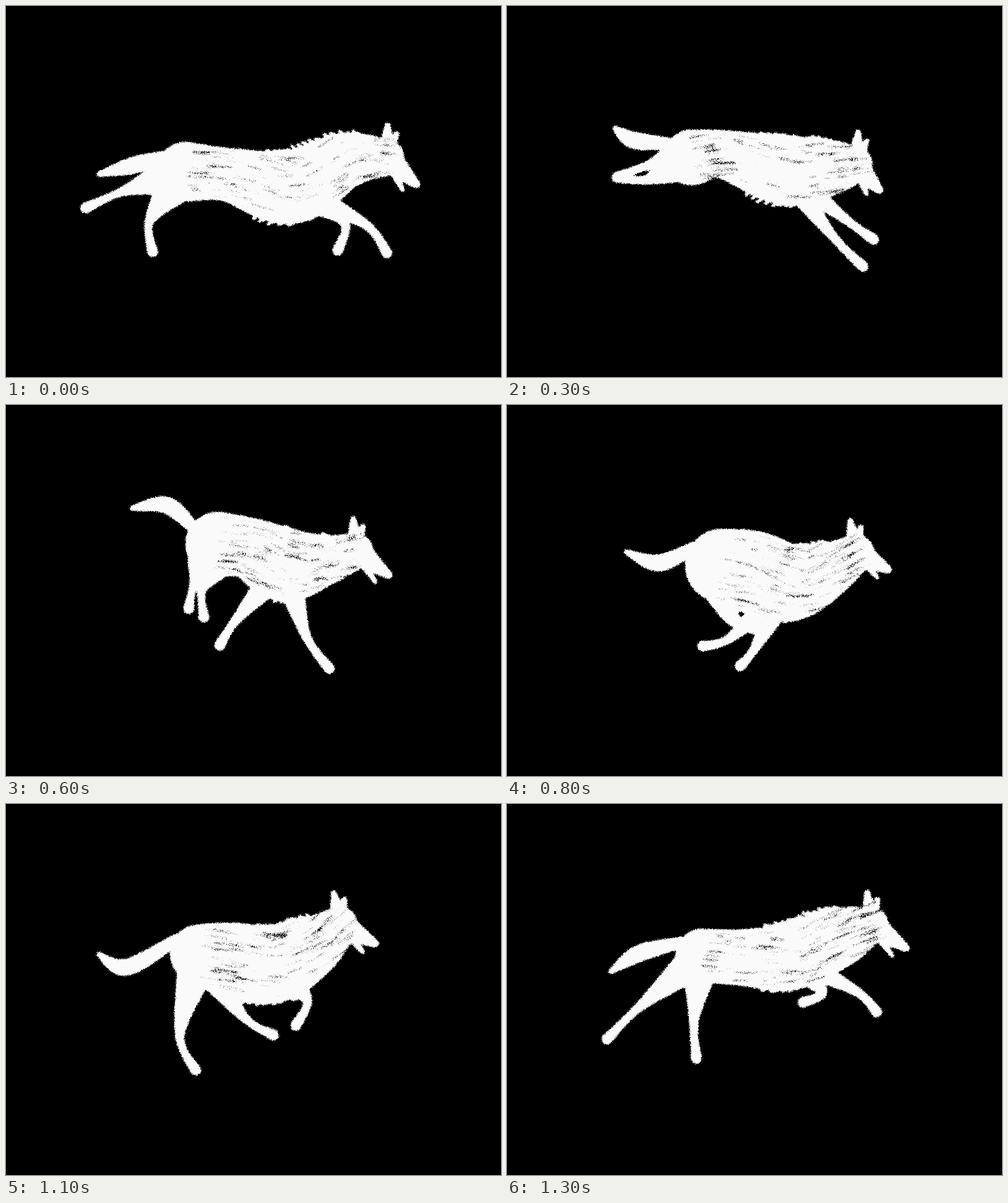
Animation of 800 by 600 pixels, one loop 1.4 s. Source, as an HTML page with a canvas:

```html
<!DOCTYPE html>
<html lang="en">
<head>
<meta charset="utf-8">
<title>Running wolf</title>
<style>
  html, body { margin: 0; width: 100%; height: 100%; overflow: hidden; background: #000; }
  canvas { display: block; }
</style>
</head>
<body>
<canvas id="stage" width="800" height="600"></canvas>
<script>
const W = 800, H = 600, STEP = 100, COUNT = 14, SKULL = 29;

// A few joints pose the wolf; every outline grows from them by rule.
// spine: rump, loin, chest, neck (x, y, radius); head: skull, nose; tail: middle, tip;
// legs: joint and foot of two hind legs, then of two forelegs.
const poses = [];
const pose = (time, spine, head, tail, legs) => poses.push({ time, spine, head, tail, legs });

pose(0, [290, 268, 48, 360, 273, 43, 460, 293, 59, 548, 250, 44],
  [615, 245, 664, 289], [205, 258, 150, 272],
  [188, 300, 128, 327, 232, 348, 237, 398, 547, 350, 536, 396, 582, 354, 616, 400]);
pose(300, [298, 245, 45, 350, 240, 39, 445, 265, 55, 515, 262, 46],
  [562, 256, 602, 298], [205, 217, 175, 198],
  [228, 258, 177, 277, 225, 281, 178, 277, 528, 374, 576, 422, 550, 347, 593, 378]);
pose(500, [332, 237, 48, 375, 242, 42, 445, 272, 58, 510, 270, 41],
  [555, 258, 594, 295], [243, 178, 206, 181],
  [276, 285, 242, 321, 280, 285, 260, 332, 412, 378, 428, 412, 522, 382, 579, 425]);
pose(600, [342, 225, 52, 395, 232, 49, 450, 258, 59, 510, 252, 41],
  [565, 236, 619, 275], [260, 162, 204, 167],
  [304, 290, 295, 330, 316, 300, 320, 344, 370, 350, 345, 389, 486, 375, 523, 427]);
pose(900, [350, 277, 63, 400, 290, 75, 460, 302, 63, 520, 275, 46],
  [565, 240, 615, 262], [238, 302, 187, 273],
  [395, 395, 469, 412, 390, 370, 441, 383, 355, 387, 301, 383, 357, 385, 303, 383]);
pose(1100, [312, 242, 47, 365, 250, 58, 430, 260, 62, 495, 230, 48],
  [540, 195, 597, 226], [195, 264, 150, 243],
  [281, 374, 307, 431, 385, 345, 433, 374, 470, 300, 465, 310, 487, 318, 468, 359]);
pose(1300, [315, 245, 43, 375, 248, 45, 455, 247, 53, 530, 218, 49],
  [588, 195, 645, 233], [213, 242, 168, 271],
  [212, 330, 161, 381, 302, 352, 306, 412, 510, 305, 478, 321, 566, 304, 598, 337]);
poses.push({ ...poses[0], time: COUNT * STEP });

const mix = (a, b, k) => a + (b - a) * k;
const polar = ([x, y], angle, len) => [x + len * Math.cos(angle), y + len * Math.sin(angle)];

function seeded(s) {
  return () => {
    s = s + 0x6D2B79F5 | 0;
    let t = Math.imul(s ^ s >>> 15, 1 | s);
    t = t + Math.imul(t ^ t >>> 7, 61 | t) ^ t;
    return ((t ^ t >>> 14) >>> 0) / 4294967296;
  };
}

function group(list, size) {
  const out = [];
  for (let i = 0; i < list.length; i += size) out.push(list.slice(i, i + size));
  return out;
}

function poseAt(time) {
  const i = poses.findIndex(p => p.time > time);
  const a = poses[i - 1], b = poses[i];
  const k = (time - a.time) / (b.time - a.time);
  const between = part => a[part].map((n, j) => mix(n, b[part][j], k));
  const legs = group(group(between('legs'), 2), 2);
  // Feet travel in arcs: low when pushing back, lifted when reaching forward.
  legs.forEach(([joint, foot], l) => {
    const lift = (b.legs[l * 4 + 2] - a.legs[l * 4 + 2]) * .13 * Math.sin(Math.PI * k);
    joint[1] -= lift / 2;
    foot[1] -= lift;
  });
  const [skull, nose] = group(between('head'), 2);
  const spine = [...group(between('spine'), 3), [...skull, SKULL]];
  return { spine, skull, nose, legs, tail: group(between('tail'), 2) };
}

// Point on the smooth curve through pts; u counts joints.
function curve(pts, u) {
  const i = Math.max(0, Math.min(pts.length - 2, Math.floor(u))), t = u - i;
  const p = pts[i], q = pts[i + 1], o = pts[i - 1] || p, r = pts[i + 2] || q;
  return p.map((b, j) => {
    const a = o[j], c = q[j], d = r[j];
    return b + t / 2 * (c - a + t * (2 * a - 5 * b + 4 * c - d + t * (3 * (b - c) + d - a)));
  });
}

function limb(g, ...pts) {
  for (let u = 0; u <= pts.length - 1; u += .02) {
    const [x, y, r] = curve(pts, u);
    g.beginPath();
    g.arc(x, y, Math.max(r, 1), 0, 7);
    g.fill();
  }
}

function line(g, x, y, dx, dy, width) {
  g.lineWidth = width;
  g.beginPath();
  g.moveTo(x, y);
  g.lineTo(x + dx, y + dy);
  g.stroke();
}

function drawHead(g, skull, nose) {
  const dx = nose[0] - skull[0], dy = nose[1] - skull[1];
  const angle = Math.atan2(dy, dx), len = Math.hypot(dx, dy);
  const spike = (turn, length, from, to) =>
    limb(g, [...skull, from], [...polar(skull, angle + turn, length), to]);
  spike(0, len, 23, 6);
  spike(.38, len * .9, 10, 3);
  spike(-2.27, 53, 17, 4);
  spike(-1.9, 42, 12, 4);
}

function drawLeg(g, [x, y, r], [joint, foot], thick) {
  const start = polar([x, y], Math.atan2(joint[1] - y, joint[0] - x), r * .6);
  limb(g, [...start, r * thick], [...joint, 7.5], [...foot, 8.5]);
}

// Position across the spine: side -1 is the back, 1 the belly.
function across(spine, u, side) {
  const [x, y, r] = curve(spine, u), [nx, ny] = curve(spine, u + .01);
  const angle = Math.atan2(ny - y, nx - x);
  return { at: polar([x, y], angle + Math.PI / 2, r * side), angle };
}

function drawFur(g, spine, rand) {
  for (let u = 1.6; u < 3.5; u += .1) {
    for (const side of [-1, 1]) {
      const { at: [x, y] } = across(spine, u, side * .96);
      line(g, x, y, -6 - 6 * rand(), side * (2 + 4 * rand()), 5);
    }
  }
}

function drawStreaks(g, spine, rand) {
  for (let n = 0; n < 130; n++) {
    const { at, angle } = across(spine, rand() * 3.9, (rand() * 2 - 1) * .9);
    const len = 8 + 34 * rand();
    g.strokeStyle = `rgba(0,0,0,${.12 + .38 * rand()})`;
    line(g, ...at, len * Math.cos(angle), len * Math.sin(angle), 1 + 3 * rand());
  }
}

const stage = document.getElementById('stage').getContext('2d');
const layer = () => {
  const c = document.createElement('canvas');
  c.width = W;
  c.height = H;
  return c.getContext('2d', { willReadFrequently: true });
};
const shape = layer(), soft = layer();

function bake(n) {
  const rand = seeded(n * 977 + 5);
  const { spine, skull, nose, tail, legs } = poseAt(n * STEP);
  const [rump, , chest] = spine;
  shape.fillStyle = '#000';
  shape.fillRect(0, 0, W, H);
  shape.fillStyle = shape.strokeStyle = '#fff';
  shape.lineCap = 'round';
  limb(shape, ...spine);
  drawHead(shape, skull, nose);
  limb(shape, [rump[0] - .75 * rump[2], rump[1] - .5 * rump[2], 9], [...tail[0], 13.5], [...tail[1], 4]);
  legs.forEach((leg, i) => i < 2 ? drawLeg(shape, rump, leg, .62) : drawLeg(shape, chest, leg, .36));
  drawFur(shape, spine, rand);
  drawStreaks(shape, spine, rand);
  soft.filter = 'blur(1.8px)';
  soft.drawImage(shape.canvas, 0, 0);

  // Chalk grain: compare the softened shape with noise.
  const image = soft.getImageData(0, 0, W, H), d = image.data;
  for (let i = 0; i < d.length; i += 4) {
    const p = d[i] / 255;
    const lit = p < .05 ? 0 : Math.min(1, Math.max(0, .5 + (p - .15 - .65 * rand()) * 3));
    d[i] = d[i + 1] = d[i + 2] = 250 * lit;
    d[i + 3] = 255;
  }
  return image;
}

const frames = Array.from({ length: COUNT }, (_, n) => bake(n));
const start = performance.now();

function show() {
  const elapsed = Math.max(0, performance.now() - start);
  stage.putImageData(frames[Math.floor(elapsed / STEP) % COUNT], 0, 0);
  requestAnimationFrame(show);
}
show();
</script>
</body>
</html>
```
